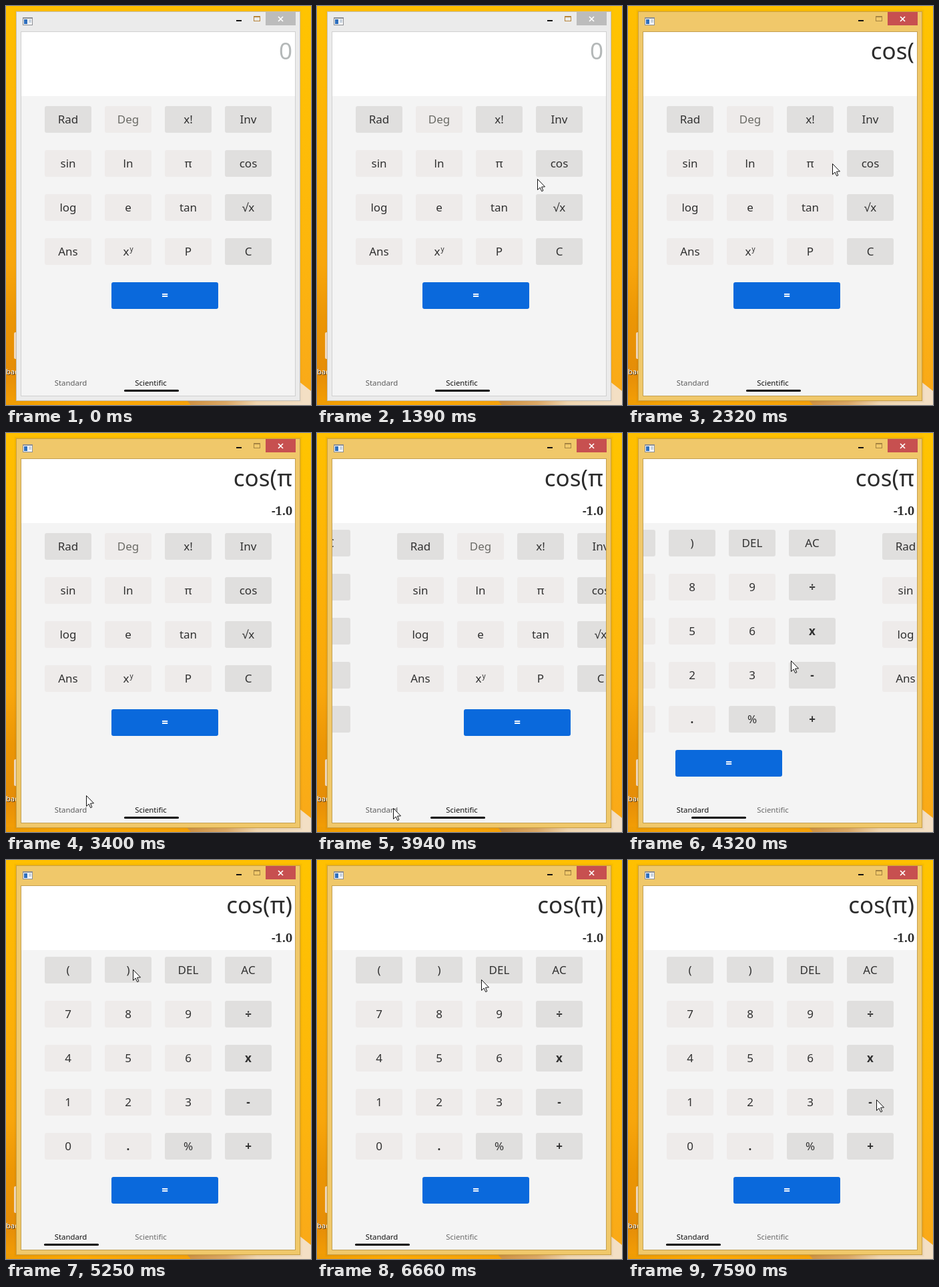
An HTML page with a canvas for the animation above (8000 ms loop, 457x598 px).

```html
<!DOCTYPE html>
<html lang="en">
<head>
<meta charset="utf-8">
<title>Calculator</title>
<style>
html, body { margin: 0; width: 100%; height: 100%; overflow: hidden; }
canvas { display: block; width: 457px; height: 598px; }
</style>
</head>
<body>
<canvas id="stage" width="457" height="598"></canvas>
<script>
const ctx = document.getElementById('stage').getContext('2d');
const LOOP = 8000;
const SANS = '"Noto Sans", "Open Sans", sans-serif';
const PAGE_W = 410;

const bursts = [
  [300, 460], [840, 1070], [1240, 1860], [2020, 2020], [2250, 3020],
  [3090, 3090], [3240, 3630], [3780, 4550], [4630, 4860], [5010, 5100],
  [5250, 5250], [6660, 6810], [6980, 7210], [7360, 7590]
];
const steps = [0];
for (const [from, to] of bursts) {
  const n = Math.round((to - from) / 77);
  for (let i = 0; i <= n; i++) steps.push(n ? from + (to - from) * i / n : from);
}

const snap = t => steps.reduce((last, s) => (s <= t ? s : last), 0);

// Pointer path: time, x, y
const path = [
  [300, 332, 579], [460, 238, 410], [917, 229, 380], [1070, 274, 316],
  [1317, 330, 259], [1395, 335, 253], [1627, 352, 228], [2020, 352, 228],
  [2404, 276, 242], [2712, 267, 244], [2866, 222, 345], [3020, 145, 491],
  [3400, 120, 544], [3630, 114, 562], [4090, 114, 562], [4319, 244, 341],
  [4473, 287, 298], [4550, 287, 296], [4707, 243, 218], [4860, 190, 165],
  [5010, 190, 164], [6580, 190, 164], [6735, 298, 194], [6810, 342, 208],
  [7057, 334, 240], [7210, 335, 280], [7437, 357, 334], [7590, 372, 359]
];

function pointerAt(t) {
  const i = path.findIndex(p => p[0] > t);
  if (i === 0) return null;
  if (i < 0) return path[path.length - 1].slice(1);
  const [t0, x0, y0] = path[i - 1], [t1, x1, y1] = path[i];
  const k = (t - t0) / (t1 - t0);
  return [Math.round(x0 + (x1 - x0) * k), Math.round(y0 + (y1 - y0) * k)];
}

const clamp = v => Math.min(1, Math.max(0, v));

// Quadratic ends with a linear middle
function easeBoth(v) {
  const k = clamp(v);
  if (k < 0.2) return 3.125 * k * k;
  if (k > 0.8) return 1 - 3.125 * (1 - k) * (1 - k);
  return 1.25 * (k - 0.1);
}

function mix(a, b, k) {
  return `rgb(${a.map((v, i) => Math.round(v + (b[i] - v) * k)).join(',')})`;
}

function rect(x, y, w, h, color) {
  ctx.fillStyle = color;
  ctx.fillRect(x, y, w, h);
}

function frame(x, y, w, h, color) {
  ctx.strokeStyle = color;
  ctx.lineWidth = 1;
  ctx.strokeRect(x + 0.5, y + 0.5, w - 1, h - 1);
}

function round(x, y, w, h, r, color) {
  ctx.fillStyle = color;
  ctx.beginPath();
  ctx.roundRect(x, y, w, h, r);
  ctx.fill();
}

function text(str, x, y, size, color, align = 'center', weight = 400, family = SANS) {
  ctx.font = `${weight} ${size}px ${family}`;
  ctx.textAlign = align;
  ctx.fillStyle = color;
  ctx.fillText(str, x, y);
}

function poly(points, color) {
  ctx.fillStyle = color;
  ctx.beginPath();
  points.forEach(([x, y]) => ctx.lineTo(x, y));
  ctx.closePath();
  ctx.fill();
}

function gradient(x0, y0, x1, y1, stops) {
  const g = ctx.createLinearGradient(x0, y0, x1, y1);
  stops.forEach(([at, color]) => g.addColorStop(at, color));
  return g;
}

function drawDesktop() {
  rect(0, 0, 457, 598, gradient(0, 0, 0, 598,
    [[0, '#ffc000'], [0.35, '#fdb208'], [0.65, '#f8a60c'], [0.78, '#ec9604'], [0.92, '#e58d08'], [1, '#f5a004']]));
  rect(441, 0, 16, 598, gradient(0, 0, 0, 598, [[0, '#ffc400'], [0.6, '#fdb60c'], [1, '#f9a81a']]));
  rect(0, 590, 280, 8, gradient(0, 0, 280, 0, [[0, '#ee9b04'], [0.4, '#fdaa04'], [1, '#f6a20a']]));
  poly([[270, 590], [441, 590], [441, 598], [277, 598]],
    gradient(270, 0, 441, 0, [[0, '#cf9140'], [0.35, '#dca966'], [0.62, '#f0d6b0'], [1, '#f3dfc4']]));
  poly([[438, 562], [457, 577], [457, 598], [438, 598]], '#f3dfc4');
  round(12, 489, 8, 40, 2, '#f3dcc2');
  text('bac', 1, 553, 11, '#3a2a10', 'left');
  text('bac', 0, 552, 11, '#fff', 'left');
}

function drawWindow(active) {
  for (let i = 1; i <= 3; i++)
    frame(15 - i, 8 - i, 426 + 2 * i, 584 + 2 * i, `rgba(90,60,0,${(0.1 - i * 0.025) * (0.4 + 0.6 * active)})`);
  rect(15, 8, 426, 584, mix([235, 235, 235], [240, 200, 106], active));
  frame(15, 8, 426, 584, mix([196, 192, 184], [201, 161, 72], active));
  frame(22, 38, 412, 547, mix([208, 208, 208], [196, 160, 82], active));

  rect(25, 17, 15, 12, '#8c8f94');
  rect(26, 19, 13, 9, '#f8f8f8');
  rect(27, 20, 5, 7, '#2f6fbd');
  rect(34, 20, 4, 5, '#c9d3de');

  rect(345, 21, 8, 2, '#111');
  const edge = mix([184, 133, 58], [166, 132, 66], active);
  frame(371, 15, 10, 8, edge);
  rect(371, 15, 10, 2, edge);
  rect(389, 9, 45, 20, mix([188, 188, 188], [199, 80, 80], active));
  ctx.strokeStyle = '#fff';
  ctx.lineWidth = 1.7;
  ctx.beginPath();
  ctx.moveTo(408, 16); ctx.lineTo(415, 23);
  ctx.moveTo(415, 16); ctx.lineTo(408, 23);
  ctx.stroke();

  rect(23, 39, 410, 545, '#f4f4f4');
  rect(23, 39, 410, 96, '#fff');
}

const scientific = {
  top: 150,
  rows: ['Rad Deg x! Inv', 'sin ln π cos', 'log e tan √x', 'Ans xy P C'],
  dark: ['Rad', 'x!']
};
const standard = {
  top: 145,
  rows: ['( ) DEL AC', '7 8 9 ÷', '4 5 6 x', '1 2 3 -', '0 . % +'],
  dark: ['(', ')', 'DEL', '%']
};
const bold = '÷x-+.';

function drawKey(label, x, y, dark, pressed, used) {
  round(x, y, 70, used ? 39 : 40, 3, dark ? '#e0dfde' : '#eeebea');
  const color = label === 'Deg' ? '#6b6b66' : '#303030';
  const size = pressed ? 21 : 17;
  const base = y + (pressed ? 27 : 26);
  if (label === 'xy') {
    text('x', x + 32, base, size, color);
    text('y', x + 40, base - 6, 10, color);
  } else {
    text(label, x + 35, base, size, color, 'center', bold.includes(label) ? 700 : 400);
  }
}

function drawPage(page, dx, pressed, used) {
  if (Math.abs(dx) >= PAGE_W) return;
  page.rows.forEach((row, r) => row.split(' ').forEach((label, c) =>
    drawKey(label, 58 + 90 * c + dx, page.top + 66 * r,
      c === 3 || page.dark.includes(label), label === pressed, used.includes(label))));
  const y = page.top + 66 * page.rows.length;
  round(158 + dx, y, 160, 40, 3, '#0a69dc');
  text('=', 238 + dx, y + 26, 17, '#fff', 'center', 700);
}

function drawDisplay(t) {
  const entry = t < 2020 ? '0' : t < 2710 ? 'cos(' : t < 5250 ? 'cos(π' : 'cos(π)';
  text(entry, 429, 80, 35, entry === '0' ? '#b4b8b8' : '#2c2c2c', 'right');
  if (t >= 2710) text('-1.0', 429, 123, 18, '#2c2c2c', 'right', 700, '"Noto Serif", serif');
}

function drawTabs(t) {
  const k = t >= 4550 ? 1 : easeBoth((t - 3832) / 755);
  const first = t > 4150;
  text('Standard', 97, 569, 11.4, first ? '#111' : '#5c5c5c');
  text('Scientific', 217, 569, 11.4, first ? '#6a6a6a' : '#111');
  round(Math.round(177 - 120 * k), 575, 82, 3, 1.5, '#000');
}

function drawPointer([x, y]) {
  ctx.save();
  ctx.translate(x + 0.5, y + 0.5);
  poly([[0, 0], [0, 16], [3.7, 12.6], [6.2, 18.2], [8.4, 17.2], [6, 11.7], [11, 11.4]], '#fff');
  ctx.strokeStyle = '#111';
  ctx.lineWidth = 1;
  ctx.stroke();
  ctx.restore();
}

function pressedKey(t) {
  if (t >= 1625 && t < 2020) return 'cos';
  if (t >= 2557 && t < 2710) return 'π';
  if (t >= 5100 && t < 5250) return ')';
  return '';
}

function draw(now) {
  const t = snap(now % LOOP);
  const pressed = pressedKey(t);
  const used = (t >= 2710 ? 'π' : '') + (t >= 5250 ? ')' : '');
  const shift = Math.round(PAGE_W * (t >= 4550 ? 1 : easeBoth((t - 3766) / 757)));

  drawDesktop();
  drawWindow(clamp((t - 1550) / 310));
  drawDisplay(t);

  ctx.save();
  ctx.beginPath();
  ctx.rect(23, 135, 410, 420);
  ctx.clip();
  drawPage(scientific, shift, pressed, used);
  drawPage(standard, shift - PAGE_W, pressed, used);
  ctx.restore();

  drawTabs(t);
  const at = pointerAt(t);
  if (at) drawPointer(at);
}

const start = performance.now();
function tick() {
  draw(performance.now() - start);
  requestAnimationFrame(tick);
}
tick();
</script>
</body>
</html>
```
